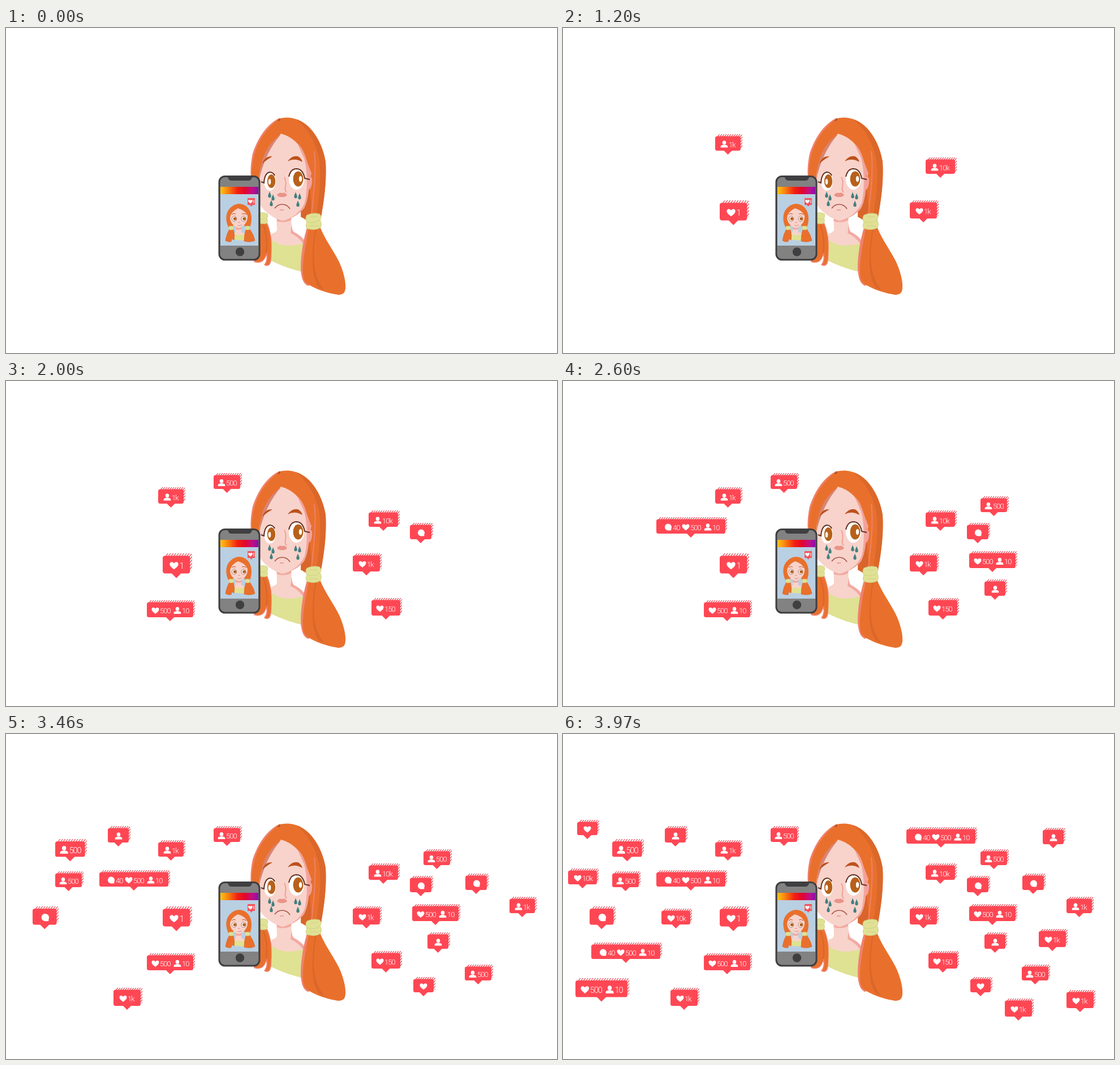
An HTML page that plays this animation: 974 px wide and 575 px high, repeating every 4.07 s.

```html
<!DOCTYPE html>
<html lang="en">
<head>
<meta charset="utf-8">
<title>Likes</title>
<style>
html, body { margin: 0; width: 100%; height: 100%; overflow: hidden; background: #fff; }
svg { display: block; width: 100%; height: 100%; }
text { font: 300 13px Roboto, "Open Sans", sans-serif; letter-spacing: -1px; fill: #fff; }
</style>
</head>
<body>
<svg viewBox="0 0 974 575">
  <defs>
    <linearGradient id="bar">
      <stop offset="0" stop-color="#fdc414"/><stop offset=".18" stop-color="#f98a10"/>
      <stop offset=".45" stop-color="#f3200f"/><stop offset=".65" stop-color="#e3052f"/>
      <stop offset=".85" stop-color="#c00f86"/><stop offset="1" stop-color="#8a0fae"/>
    </linearGradient>
    <pattern id="hatch" width="4" height="5" patternUnits="userSpaceOnUse">
      <path d="M-1 6L5 -1.5M-5 6L1 -1.5M3 6L9 -1.5" stroke="#e23e4b" stroke-width="1.1"/>
    </pattern>
    <path id="h" fill="#fff" d="M0 6C-3 3.5-6.5 1-6.5-2C-6.5-5.5-2-6.5 0-3C2-6.5 6.5-5.5 6.5-2C6.5 1 3 3.5 0 6Z"/>
    <path id="p" fill="#fff" d="M0-6.2A3.2 3.4 0 0 1 0 .8A3.2 3.4 0 0 1 0-6.2ZM-6.3 6V4.2C-6.3 1.8-2.5 1 0 1S6.3 1.8 6.3 4.2V6Z"/>
    <path id="o" fill="#fff" d="M5.2 5.8L.5 6A6 6 0 1 1 5.4 2.6Z"/>
    <path id="tear" fill="#417f80" d="M0-6C.6-3 2.7-.5 2.7 2.2A2.7 3 0 0 1-2.7 2.2C-2.7-.5-.6-3 0-6Z"/>
  </defs>

  <g id="girl">
    <!-- hair behind the neck -->
    <path fill="#d9652a" d="M523 250L547 275L545 328L533 341L521 334Z"/>
    <!-- left ponytail -->
    <path fill="#f0806a" d="M446 343L462 345C467 357 471 375 471 392C470 404 469 416 466 419Q461 423 456 419Q462 412 460 402C457 412 451 418 438 414Z"/>
    <path fill="#e9702c" d="M444 343L460 345C466 358 469 374 469 390C468 405 467 416 464 418Q461 420 459 418Q465 410 461 394C459 408 452 416 441 413Z"/>
    <path fill="none" stroke="#d9652a" stroke-width="2" d="M455 348Q464 372 460 398"/>
    <!-- neck, shoulders, top -->
    <path fill="#f8d3cb" d="M478 329L505 327Q503 350 507 360Q521 366 530 379L524 394H470L469 364Q478 362 479 357Z"/>
    <path fill="#f2aaa2" d="M478 331L505 329L504 340Q493 346 479 342ZM505 346Q505 357 509 361Q522 367 530 379L525 381Q516 369 503 363Z"/>
    <path fill="#dfe193" d="M470 375Q480 384 498 385Q514 385 528 380L522 431Q496 425 469 412Z"/>
    <!-- hair cap -->
    <path fill="#f0806a" d="M484 159C462 169 445 194 436 222Q431 246 433 266L452 290L480 190Z"/>
    <path fill="#e9702c" d="M483 161C491 157 508 158 520 164C544 176 560 206 565 237C567 272 562 305 557 334H541L534 250L486 187L451 243L449 285L434 265C434 240 439 216 450 197C461 179 472 168 483 161Z"/>
    <path fill="#db672a" d="M512 161C540 172 560 204 565 237C567 274 562 306 557 334H548C555 295 558 256 553 228C547 203 534 178 512 161Z"/>
    <path fill="none" stroke="#8c4321" d="M480 164L485 160L482 165"/>
    <!-- ear, face -->
    <path fill="#f0a29b" d="M529 270C534 259 543 261 541 273C540 284 536 289 528 287Z"/>
    <path fill="#f3a59d" d="M486 187C507 193 523 211 532 237C539 270 536 301 527 319Q515 334 491 341L475 320Z"/>
    <path fill="#f8d3cb" d="M486 187C505 192 518 204 525 221C534 255 533 287 528 309C522 325 506 337 489 341C472 337 455 324 448 311V260Q452 224 486 187Z"/>
    <path fill="#d88473" d="M486 188Q474 196 464 210Q449 233 448 267Q453 243 464 221Q473 203 486 188Z"/>
    <path fill="#f2a198" d="M515 204Q526 213 532 236L540 257L537 268Q532 239 524 224Z"/>
    <!-- brows -->
    <path fill="#bd511b" d="M453 240Q458 226 471 227Q462 232 453 240ZM498 236Q505 225 516 227Q522 230 524 237Q510 229 498 236Z"/>
    <!-- eyes -->
    <g fill="#fff">
      <ellipse cx="466.500" cy="271" rx="10.500" ry="16.500"/><ellipse cx="513.500" cy="267.500" rx="13.500" ry="18.500"/>
    </g>
    <g fill="#b7611a">
      <ellipse cx="469" cy="271" rx="7.200" ry="12"/><ellipse cx="516.500" cy="267" rx="9" ry="13.500"/>
    </g>
    <g fill="#fff">
      <ellipse cx="466" cy="272" rx="2.300" ry="5"/><ellipse cx="520.500" cy="267" rx="2.700" ry="5.200"/>
    </g>
    <path fill="none" stroke="#63301f" stroke-width="2" d="M451 272L456 274Q457 257 466 255Q472 255 475 261M500 263Q503 249 514 249Q525 250 528 266L537 268"/>
    <!-- nose, mouth -->
    <path fill="none" stroke="#efa097" stroke-width="2" d="M492 264Q496 271 494 281Q492 286 496 291"/>
    <path fill="#e9938a" d="M479 296Q482 290 488 292Q494 290 497 296Q493 300 488 299Q483 300 479 296Z"/>
    <path fill="none" stroke="#a9574b" stroke-width="1.700" d="M475 319Q480 312 488 312Q497 312 502 320"/>
    <path stroke="#eaa198" stroke-width="2" d="M484 322H491"/>
    <g id="tears"></g>
    <!-- right ponytail -->
    <path fill="#f0806a" d="M532 353C524 380 519 415 522 436Q524 451 533 456L560 450L548 354Z"/>
    <path fill="#e9702c" d="M535 354H556C564 374 579 394 588 412C597 431 601 449 600 461Q599 473 587 472C567 469 540 460 529 449C521 437 526 407 530 382Z"/>
    <path fill="#db672a" d="M549 354C544 380 542 412 548 435Q552 450 562 463L553 460Q542 442 542 420C541 396 543 373 547 354Z"/>
    <path fill="none" stroke="#f0806a" stroke-width="2" d="M545 218C549 250 544 292 540 330"/>
    <!-- hair ties -->
    <g fill="#e0e195" stroke="#cfd283" stroke-width="1">
      <path d="M532 331Q543 326 554 329Q559 333 555 340Q559 345 556 353Q547 359 533 355Q528 351 532 344Q528 336 532 331Z"/>
      <path fill="none" d="M533 343Q544 347 555 340M538 334Q547 335 551 333M537 350Q546 349 553 351"/>
      <path d="M446 328Q456 325 462 329Q464 333 461 337Q464 342 460 346Q453 347 446 345ZM449 338H460"/>
    </g>
  </g>

  <g id="phone">
    <rect x="377" y="262.500" width="71" height="147.500" rx="10" fill="#828282" stroke="#3f3e40" stroke-width="3"/>
    <path fill="#3f3e40" d="M391 261H436Q434 270 429 270H398Q393 270 391 261Z"/>
    <rect x="379" y="281" width="67" height="13" fill="url(#bar)"/>
    <rect x="379" y="294" width="67" height="91" fill="#b9cfe2"/>
    <circle cx="413.500" cy="396" r="7.700" fill="#3f3e40"/>
    <path fill="#f4545b" d="M427 301H440V313H436L433.500 316L431 313H427Z"/>
    <use href="#h" transform="translate(432 307) scale(.6)"/>
    <path stroke="#fff" d="M438 304V310"/>
    <!-- selfie -->
    <path fill="#e9702c" d="M411 311C426 311 434 323 434 337Q434 346 431 352H424L412 340L399 352H393C388 341 388 329 394 321Q401 312 411 311Z"/>
    <path fill="#f8d3cb" d="M406 346H416V361Q423 363 426 368H399Q402 363 406 361Z"/>
    <path fill="#dfe193" d="M401 364Q412 369 424 364L425 375Q413 377 401 374Z"/>
    <path fill="#f8d3cb" d="M410 319Q422 322 427 332Q428 347 412 354Q397 349 396 336Q397 325 410 319Z"/>
    <path fill="#f2aaa2" d="M406 352L412 354L416 352V356Q411 358 406 356Z"/>
    <path fill="#e9702c" stroke="#d9652a" stroke-width=".7" d="M395 356L402 357Q405 367 403 375L399 373L398 378Q392 379 388 376Q390 364 395 356ZM424 357L431 356Q438 366 440 376Q432 380 421 377Q421 365 424 357Z"/>
    <g fill="#e0e195" stroke="#cfd283" stroke-width=".6">
      <rect x="394" y="350.500" width="8" height="6.500" rx="2"/><rect x="423" y="350.500" width="8" height="6.500" rx="2"/>
    </g>
    <g fill="#fff" stroke="#63301f" stroke-width=".6">
      <ellipse cx="403.500" cy="337.500" rx="4" ry="4.600"/><ellipse cx="420" cy="337.500" rx="4" ry="4.600"/>
    </g>
    <g fill="#b7611a"><circle cx="404.500" cy="337.500" r="2.700"/><circle cx="421" cy="337.500" r="2.700"/></g>
    <path fill="none" stroke="#bd511b" d="M399 330Q402 327 406 329M417 329Q421 327 425 330"/>
    <path fill="none" stroke="#dc8c84" d="M410 344H414M409 349Q413 351 417 348"/>
  </g>
  <g id="badges"></g>
</svg>
<script>
const tears = [[466, 295], [472, 300], [469, 310], [512, 296], [519, 298], [516, 311]];
document.getElementById('tears').innerHTML =
  tears.map(([x, y]) => `<use href="#tear" x="${x}" y="${y}"/>`).join('');

// kind: [width, height, first icon offset, items]; items start with h(eart), p(erson) or o (comment)
const kinds = {
  h: [39, 34, 18, 'h'], p: [40, 36, 19, 'p'], o: [41, 36, 20, 'o'],
  h1: [44, 37, 17, 'h1'], h1k: [51, 39, 17, 'h1k'], h10k: [54, 35, 17, 'h10k'],
  h150: [54, 38, 15, 'h150'], p500: [50, 35, 14, 'p500'],
  p1k: [48, 36, 16, 'p1k'], p10k: [55, 36, 16, 'p10k'],
  two: [85, 37, 15, 'h500 p10'], three: [125, 36, 21, 'o40 h500 p10']
};

// in order of appearance: kind, x, y, scale
const badges = [
  ['h1', 277, 305, 1.18], ['h1k', 613, 305], ['p10k', 641, 229], ['p1k', 269, 188],
  ['o', 714, 251], ['p500', 367, 163], ['h150', 646, 384], ['two', 249, 388],
  ['p500', 738, 204], ['two', 718, 301], ['three', 165, 241], ['p', 745, 351],
  ['h1k', 190, 449], ['h', 720, 430], ['p', 180, 163], ['o', 812, 247], ['p500', 87, 186, 1.12],
  ['p500', 87, 243], ['p500', 811, 408], ['o', 47, 305, 1.12], ['p1k', 890, 288],
  ['three', 50, 369], ['p', 848, 166], ['h10k', 9, 238], ['h1k', 781, 468], ['two', 22, 432, 1.12],
  ['h10k', 174, 309], ['h1k', 841, 345], ['h', 25, 152], ['h1k', 890, 453], ['three', 607, 165]
];

function drawBadge([kind, x, y, scale = 1]) {
  const [w, h, start, items] = kinds[kind];
  const right = w - 3, base = h - 7, mid = (base + 4) / 2 + 1, tip = right / 2;
  let at = start, inside = '';
  for (const item of items.split(' ')) {
    const label = item.slice(1);
    inside += `<use href="#${item[0]}" x="${at}" y="${mid}"/>` +
      `<text x="${at + 8}" y="${mid + 5}">${label}</text>`;
    at += 15 + 8 * label.length;
  }
  return `<g transform="translate(${x} ${y}) scale(${scale})">
    <rect x="4" width="${w - 4}" height="${base - 4}" rx="3" fill="url(#hatch)"/>
    <rect y="3.5" width="${right}" height="${base - 3.5}" rx="3.5" fill="#ff4754"/>
    <path d="M${tip - 8} ${base - 1}H${tip + 8}L${tip} ${h}Z" fill="#ff4754"/>${inside}</g>`;
}

const layer = document.getElementById('badges');
layer.innerHTML = badges.map(drawBadge).join('');

// the pace quickens: [step in ms, number of badges]
const pace = [[300, 4], [200, 4], [150, 4], [100, 4], [80, 6], [60, 5], [50, 3], [40, 1]];
let sum = 0;
const times = pace.flatMap(([step, n]) => Array.from({ length: n }, () => sum += step));

function show(now) {
  const t = now % 4070;
  [...layer.children].forEach((badge, i) => badge.style.display = t >= times[i] ? '' : 'none');
  requestAnimationFrame(show);
}
show(0);
</script>
</body>
</html>
```
